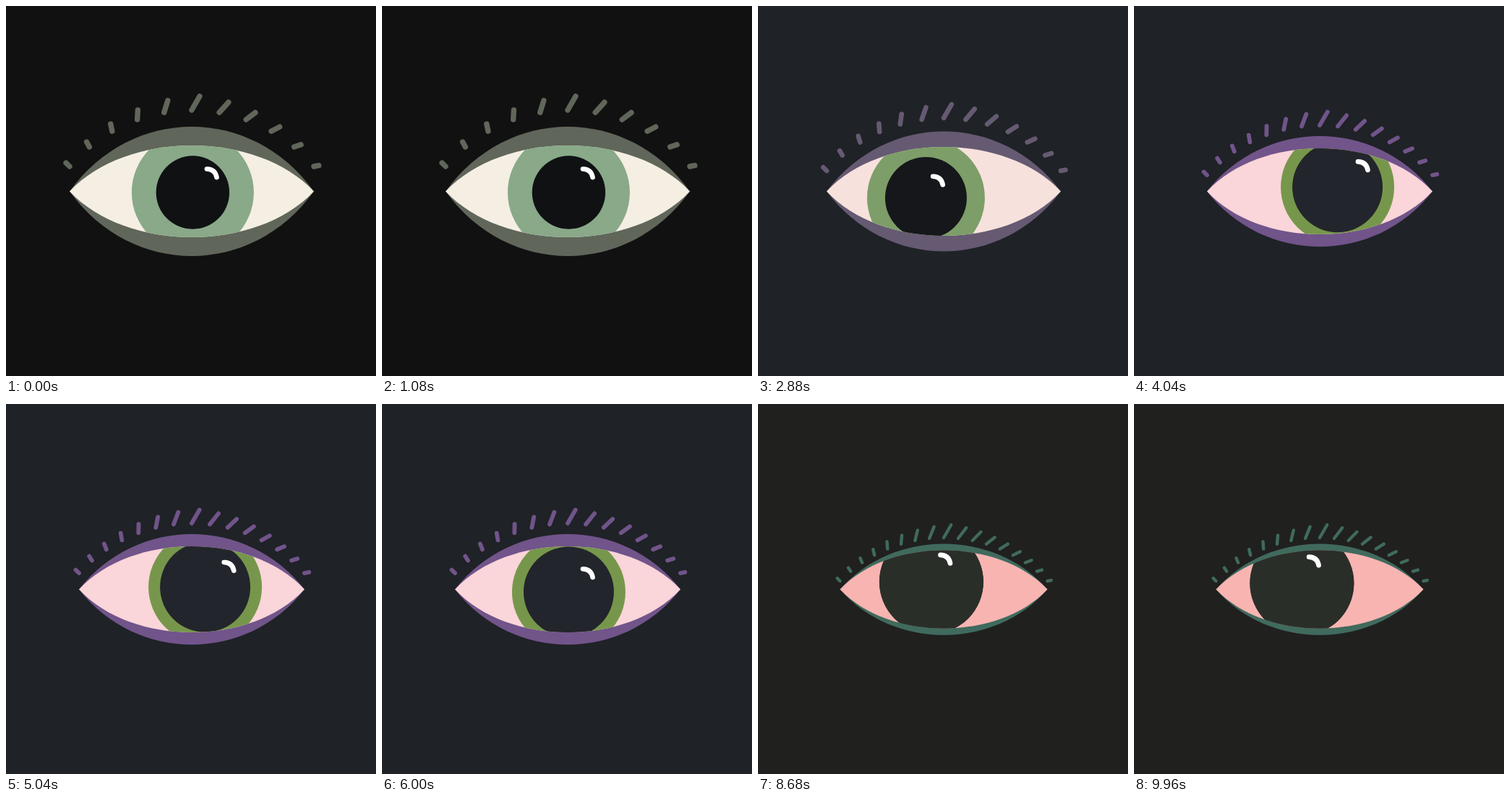
These frames come from a looping animation (512 px wide and 512 px high, 10 s). An HTML page with a canvas:

```html
<!DOCTYPE html>
<html lang="en">
<head>
<meta charset="utf-8">
<title>Eyes</title>
<style>
  html, body { margin: 0; width: 100%; height: 100%; overflow: hidden; background: #111; }
  canvas { display: block; width: 512px; height: 512px; }
</style>
</head>
<body>
<canvas width="512" height="512"></canvas>
<script>
const ctx = document.querySelector('canvas').getContext('2d');
const LOOP = 10000, CX = 257, CY = 256.6;

// half: half width; lidH / gapH: half heights of the lid and the opening
const eyes = [
  { from: 0, bg: '#111111', lid: '#60665a', white: '#f5eee3', iris: '#89a989', pupil: '#0f1113',
    half: 169, lidH: 89.5, gapH: 63.5, irisR: 84.5, pupilR: 50.7,
    lashes: 11, lashY: 144, drop: 78, lashW: 7.4, longest: 22 },
  { from: 2080, bg: '#1f2226', lid: '#655a72', white: '#f7e1dd', iris: '#7d9e68', pupil: '#15171b',
    half: 162, lidH: 83, gapH: 61.5, irisR: 81.5, pupilR: 56.5,
    lashes: 13, lashY: 155, drop: 73, lashW: 6.6, longest: 21.7 },
  { from: 4040, bg: '#1f2226', lid: '#71548a', white: '#fad5d9', iris: '#76974b', pupil: '#23252c',
    half: 156, lidH: 76.5, gapH: 59.5, irisR: 78.5, pupilR: 62.5,
    lashes: 15, lashY: 165, drop: 69, lashW: 5.8, longest: 21.4 },
  { from: 6040, bg: '#14100f', lid: '#6a5053', white: '#f8efee', iris: '#84595b', pupil: '#1b1314',
    half: 147, lidH: 66.5, gapH: 55.2, irisR: 73, pupilR: 69.8,
    lashes: 17, lashY: 181, drop: 61, lashW: 4.6, longest: 21 },
  { from: 8040, bg: '#20201f', lid: '#406a5d', white: '#f8b4b1', iris: '#2a2e29', pupil: '#2a2e29',
    half: 143.5, lidH: 63.2, gapH: 54, irisR: 72, pupilR: 72,
    lashes: 17, lashY: 185, drop: 60, lashW: 4.4, longest: 20.5 }
];

// Gaze offsets: time, x, y
const gaze = [
  [0, 0, 0], [1700, 0, 0], [3300, -28, 8], [4300, 27, -8.5], [5950, 0, 2],
  [7550, 36.5, 17], [7720, 36.5, 17], [8640, -18.5, -12], [9960, -26, -10], [LOOP, -26, -10]
];

const ease = p => p < 0.5 ? 4 * p ** 3 : 1 - 4 * (1 - p) ** 3;

function gazeAt(t) {
  const i = gaze.findIndex(k => k[0] > t);
  const [t0, x0, y0] = gaze[i - 1], [t1, x1, y1] = gaze[i];
  const p = ease((t - t0) / (t1 - t0));
  return [x0 + (x1 - x0) * p, y0 + (y1 - y0) * p];
}

// A higher fullness makes the almond rounder
function lens(half, height, fullness) {
  const hx = half * fullness, hy = height * 4 / 3;
  ctx.beginPath();
  ctx.moveTo(CX - half, CY);
  ctx.bezierCurveTo(CX - hx, CY - hy, CX + hx, CY - hy, CX + half, CY);
  ctx.bezierCurveTo(CX + hx, CY + hy, CX - hx, CY + hy, CX - half, CY);
}

function disc(x, y, r, color) {
  ctx.fillStyle = color;
  ctx.beginPath();
  ctx.arc(x, y, r, 0, 2 * Math.PI);
  ctx.fill();
}

// Lash roots sit at equal angles on an arc above the lid
function drawLashes(e) {
  const radius = (e.half ** 2 + e.drop ** 2) / (2 * e.drop);
  const spread = Math.asin(e.half / radius);
  ctx.strokeStyle = e.lid;
  ctx.lineWidth = e.lashW;
  ctx.beginPath();
  for (let i = 0; i < e.lashes; i++) {
    const u = 2 * i / (e.lashes - 1) - 1;
    const x = CX + radius * Math.sin(u * spread);
    const y = e.lashY + radius * (1 - Math.cos(u * spread));
    const tilt = (17 + 62 * u + 13 * (1 - u * u)) * Math.PI / 180;
    const length = e.longest - 15 + 15 * (1 - Math.abs(u)) ** (u < 0 ? 1.7 : 1);
    ctx.moveTo(x, y);
    ctx.lineTo(x + length * Math.sin(tilt), y - length * Math.cos(tilt));
  }
  ctx.stroke();
}

function drawEye(e, [dx, dy]) {
  ctx.fillStyle = e.bg;
  ctx.fillRect(0, 0, 512, 512);
  drawLashes(e);

  lens(e.half, e.lidH, 0.49);
  ctx.fillStyle = e.lid;
  ctx.fill();

  ctx.save();
  lens(e.half, e.gapH, 0.53);
  ctx.fillStyle = e.white;
  ctx.fill();
  ctx.clip();
  const x = 258.4 + dx, y = 258 + dy;
  disc(x, y, e.irisR, e.iris);
  disc(x, y, e.pupilR, e.pupil);
  ctx.restore();

  // The glint travels further than the pupil
  const gx = 285 + 1.38 * dx, gy = 231 + 1.38 * dy;
  ctx.strokeStyle = '#fff';
  ctx.lineWidth = 6.7;
  ctx.beginPath();
  ctx.moveTo(gx - 7, gy - 5.5);
  ctx.quadraticCurveTo(gx + 4.5, gy - 5, gx + 6.5, gy + 6);
  ctx.stroke();
}

ctx.lineCap = 'round';
function frame() {
  const t = performance.now() % LOOP;
  drawEye(eyes.findLast(e => e.from <= t), gazeAt(t));
  requestAnimationFrame(frame);
}
frame();
</script>
</body>
</html>
```
